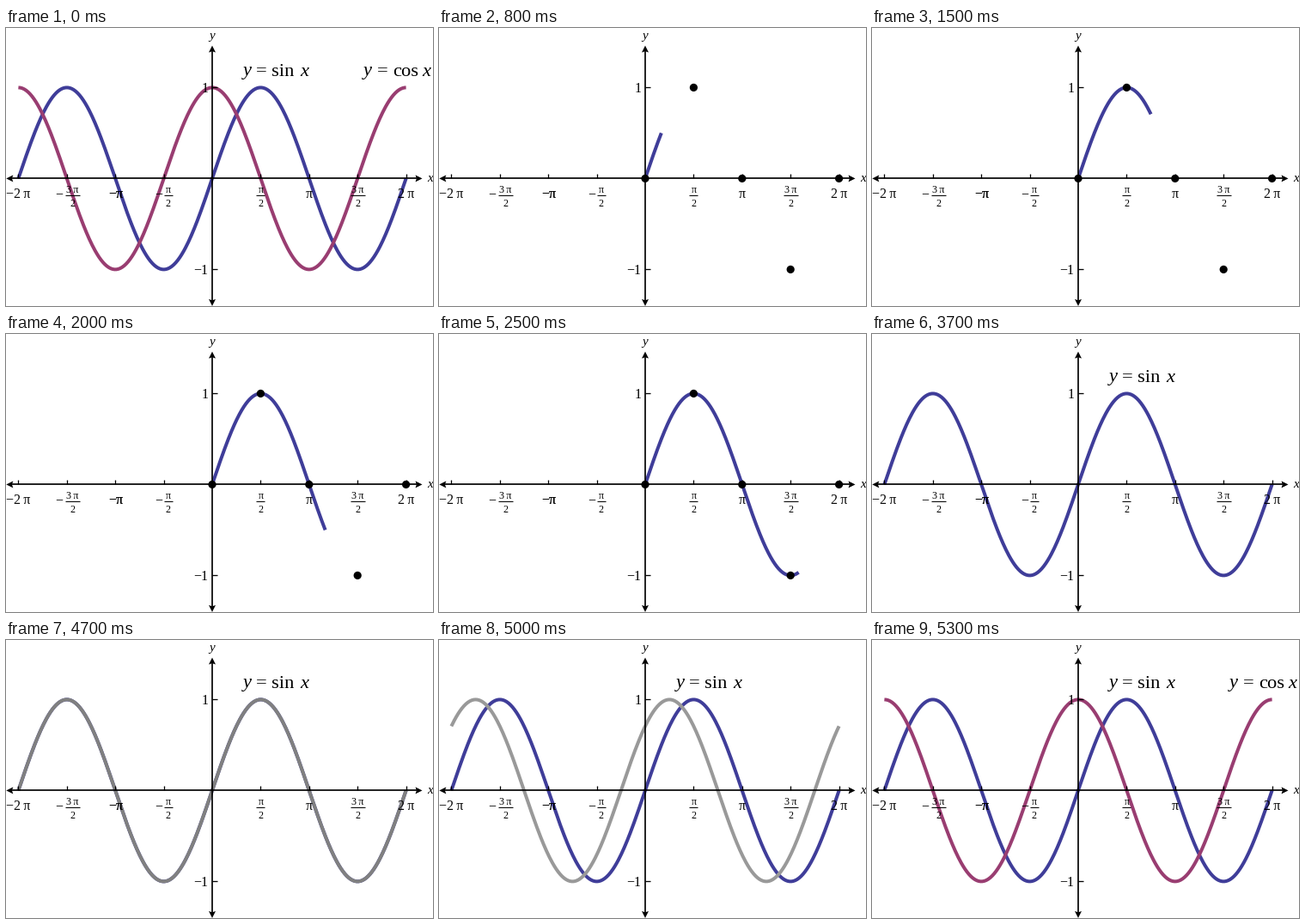
A matplotlib script for the animation above (7.3 s loop, 497 px wide and 324 px high).

```python
import numpy as np
import matplotlib.pyplot as plt
from matplotlib.animation import FuncAnimation
from matplotlib.patches import Circle, Polygon

W, H, DPI = 497, 324, 100
X0, Y0 = 240.0, 175.4          # origin in pixels
QUARTER, UNIT = 56.4, 106.0    # pixels per pi/2 and per 1
STEP = np.pi / 12              # angle covered in one frame
BLUE, PLUM = "#3f3d99", "#993d71"
FRAMES, INTERVAL = 73, 100

fig = plt.figure(figsize=(W / DPI, H / DPI), dpi=DPI, facecolor="white")
ax = fig.add_axes([0, 0, 1, 1])
ax.set_xlim(0, W)
ax.set_ylim(H, 0)
ax.axis("off")


def pt(px):
    return px * 72 / DPI


def px(angle):
    return X0 + angle / (np.pi / 2) * QUARTER


def py(value):
    return Y0 - value * UNIT


def line(xs, ys, width, color="black", z=5):
    return ax.plot(xs, ys, color=color, lw=pt(width), zorder=z,
                   solid_capstyle="butt", solid_joinstyle="round")[0]


def text(x, y, s, size, ha="center", italic=False):
    return ax.text(x, y, s, fontsize=pt(size), family="Liberation Serif",
                   style="italic" if italic else "normal",
                   ha=ha, va="baseline", zorder=6)


def arrow(x, y, dx, dy):
    """Arrowhead with its tip at (x, y), pointing along (dx, dy)."""
    shape = [(0, 0), (-8, 4), (-6.6, 0), (-8, -4)]
    pts = [(x + a * dx - b * dy, y + a * dy + b * dx) for a, b in shape]
    ax.add_patch(Polygon(pts, fc="black", ec="none", zorder=5))


def fraction(x, top, bar, minus_x=None):
    text(x, 191.5, top, 12)
    text(x, 208, "2", 12)
    line([x - bar, x + bar], [194.5, 194.5], 1, z=6)
    if minus_x is not None:
        text(minus_x, 199, "\u2212", 16)


def draw_axes():
    line([4, 480], [Y0, Y0], 1.7)
    line([X0, X0], [25, 319], 1.7)
    arrow(0.3, Y0, -1, 0)
    arrow(484.5, Y0, 1, 0)
    arrow(X0, 20.5, 0, -1)
    arrow(X0, 324, 0, 1)
    for n in range(-4, 5):
        if n:
            x = X0 + n * QUARTER
            line([x, x], [Y0, Y0 - 5.4], 1.3)
    for v in (-1, 1):
        line([X0, X0 + 5.5], [py(v)] * 2, 1.3)

    text(14.6, 198.5, "\u22122\u2009\u03c0", 16)
    fraction(77, "3\u2009\u03c0", 8.5, 61.5)
    for _ in range(2):
        text(127.4, 198.5, "\u2212\u03c0", 16)
    fraction(188.5, "\u03c0", 5, 177.5)
    fraction(296.4, "\u03c0", 5)
    text(352.6, 198.5, "\u03c0", 16)
    fraction(409.2, "3\u2009\u03c0", 8.5)
    text(465.4, 198.5, "2\u2009\u03c0", 16)
    text(235.5, 74.8, "1", 16, ha="right")
    text(235.5, 286.8, "\u22121", 16, ha="right")
    text(240, 12.5, "y", 15, italic=True)
    text(494, 179, "x", 15, italic=True)


def formula(x, name, x_arg):
    """Label 'y = name x' with its left edge at x."""
    return [text(x, 55.5, "y", 22.5, "left", True),
            text(x + 15.5, 55.5, "=", 22.5, "left"),
            text(x + 34, 55.5, name, 22.5, "left"),
            text(x_arg, 55.5, "x", 22.5, "left", True)]


draw_axes()
sine = line([], [], 4, BLUE, 2)
shifted = line([], [], 4, PLUM, 3)
dots = [ax.add_patch(Circle((X0 + n * QUARTER, py(np.sin(n * np.pi / 2))),
                            4.6, fc="black", ec="none", zorder=7))
        for n in range(5)]
sin_label = formula(275.5, "sin", 342.5)
cos_label = formula(416, "cos", 484.5)


def set_curve(curve, start, end, shift=0.0):
    a = np.linspace(start, end, 400)
    curve.set_data(px(a), py(np.sin(a + shift)))


def show(items, on):
    for item in items:
        item.set_visible(on)


def update(k):
    full = 2 * np.pi
    finale = k < 2 or k >= 53
    growing = 2 <= k < 35

    # key points appear one by one, then the curve runs through them
    for n, dot in enumerate(dots):
        dot.set_visible(2 + n <= k < 37)
    if growing:
        set_curve(sine, 0, min(max(k - 6, 0), 24) * STEP)
    else:
        set_curve(sine, -full, full)
    sine.set_visible(not growing or k > 6)

    # a grey copy slides left until it becomes the cosine
    sliding = 47 <= k < 53
    shifted.set_visible(sliding or finale)
    if sliding:
        set_curve(shifted, -full, full, (k - 47) * STEP)
        shifted.set_color(str(0.5 + (k - 47) / 30))
    elif finale:
        set_curve(shifted, -full, full, np.pi / 2)
        shifted.set_color(PLUM)

    show(sin_label, finale or k >= 37)
    show(cos_label, finale)
    return []


anim = FuncAnimation(fig, update, frames=FRAMES, interval=INTERVAL,
                     init_func=lambda: update(0), repeat=True,
                     repeat_delay=0, blit=False)
plt.show()
```
